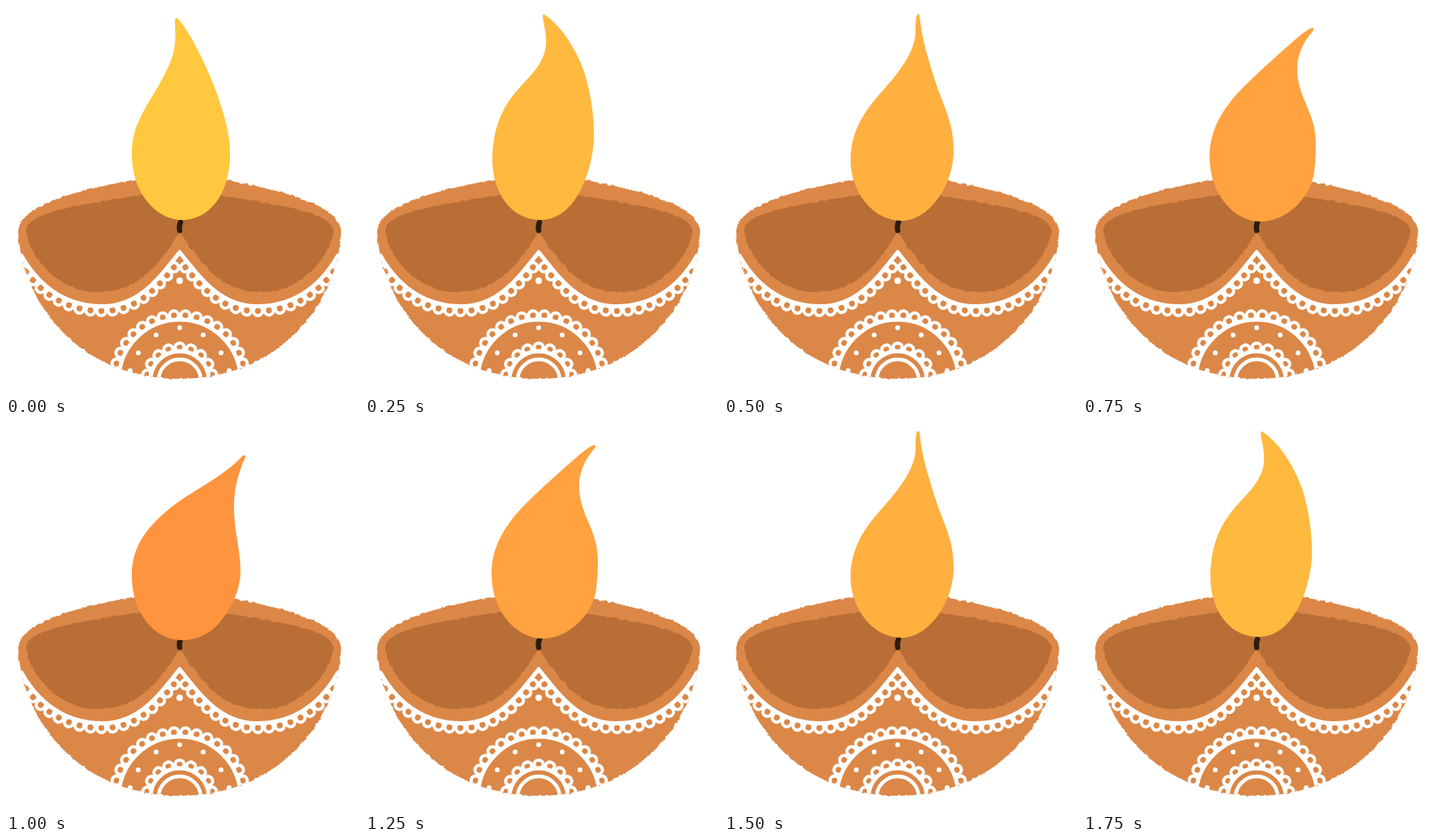
Animation, 435 px wide and 480 px high, one loop 2 s. Source, as an HTML page:

```html
<!DOCTYPE html>
<html lang="en">
<head>
<meta charset="utf-8">
<title>Diya</title>
<style>
  html, body { margin: 0; width: 100%; height: 100%; overflow: hidden; background: #fff; }
  svg { display: block; width: 435px; height: 480px; }
</style>
</head>
<body>
<svg viewBox="0 0 435 480">
  <defs>
    <path id="bowl" d="M15 278C18 248 70 231 160 214L268 214C358 231 410 248 413 278C408 372 333 460 214 460C95 460 20 372 15 278Z"/>
    <clipPath id="inBowl"><use href="#bowl"/></clipPath>
    <filter id="rough" x="-5%" y="-5%" width="110%" height="110%" color-interpolation-filters="sRGB">
      <feTurbulence type="fractalNoise" baseFrequency=".16" numOctaves="2" seed="4"/>
      <feDisplacementMap in="SourceGraphic" scale="3.5" xChannelSelector="R" yChannelSelector="G"/>
    </filter>
  </defs>
  <g filter="url(#rough)">
    <use href="#bowl" fill="#db8747"/>
    <path fill="#b96e36" d="M25 276C29 255 80 247 168 233L260 233C348 247 399 255 403 276C404 300 370 353 315 353C265 353 240 318 214 278C190 318 165 353 112 353C60 353 24 300 25 276Z"/>
  </g>
  <g clip-path="url(#inBowl)" fill="none" stroke="#fff">
    <g id="lace"></g>
    <use href="#lace" transform="translate(428) scale(-1 1)"/>
    <g id="arcs"></g>
    <g id="dots" fill="#fff" stroke="none"></g>
  </g>
  <path d="M215 267Q213 271 214 277" fill="none" stroke="#2b1d10" stroke-width="6.5" stroke-linecap="round"/>
  <path id="flame"/>
</svg>
<script>
const $ = id => document.getElementById(id);

function add(parent, tag, attrs) {
  const el = document.createElementNS("http://www.w3.org/2000/svg", tag);
  for (const k in attrs) el.setAttribute(k, attrs[k]);
  return parent.appendChild(el);
}

// A line with a row of small loops; side 1 puts them below it, -1 above
function trim(parent, d, side, count, height, reach = 1) {
  const line = add(parent, "path", { d, "stroke-width": 5, "stroke-linecap": "round" });
  const step = line.getTotalLength() * reach / count;
  for (let i = 0; i < count; i++) {
    const s = (i + .5) * step;
    const p = line.getPointAtLength(s), a = line.getPointAtLength(s - 1), b = line.getPointAtLength(s + 1);
    const angle = Math.atan2(b.y - a.y, b.x - a.x) * 180 / Math.PI;
    add(parent, "ellipse", {
      cy: height * side, rx: 5.6, ry: height, "stroke-width": 4,
      transform: `translate(${p.x} ${p.y}) rotate(${angle})`
    });
  }
}

const arc = r => `M${214 - r} 462A${r} ${r} 0 0 1 ${214 + r} 462`;

trim($("lace"), "M19 308C45 354 82 371 120 370.5C163 370 187 338 214 304", 1, 18, 5.8, .95);
trim($("arcs"), arc(75), -1, 18, 5.5);
trim($("arcs"), arc(36), -1, 9, 5);
add($("arcs"), "path", { d: arc(26), "stroke-width": 4.5 });

const dots = [[214, 339], [214, 397], [185, 406], [163, 428], [153, 450]];
for (const [x, y] of dots)
  for (const cx of new Set([x, 428 - x])) add($("dots"), "circle", { cx, cy: y, r: y < 350 ? 4 : 3 });

// Flame poses, from upright to leaning right
const poses = [
  ["#ffc83f", "M211 15C222 24 246 70 258 103C269 133 277 160 276 186C275 233 250 264 217 264C186 264 155 232 155 182C155 140 180 118 200 75C210 54 209 40 208 18Q209 14 211 15Z"],
  ["#ffb93f", "M220 10C240 22 261 53 271 84C279 111 283 140 282 166C280 200 262 264 216 264C180 264 157 230 157 190C157 160 165 132 182 111C198 90 221 74 223 48C224 34 220 24 219 12Z"],
  ["#ffb03f", "M241 11C243 40 253 70 264 104C275 132 283 150 283 178C283 222 252 265 219 265C184 265 156 230 156 190C156 158 170 134 189 112C210 88 234 62 236 34C236 24 236 14 238 11Q239 9 241 11Z"],
  ["#ffa23f", "M284 30C270 46 263 62 264 82C266 110 279 124 285 150C288 168 287 185 285 205C280 238 250 266 219 266C186 266 156 232 156 186C156 155 170 130 192 106C214 83 243 58 262 41C270 34 277 29 282 27Q285 27 284 30Z"],
  ["#ff943e", "M295 42C286 62 280 84 281 108C282 138 289 156 289 184C288 212 274 234 260 250C248 262 232 268 217 268C181 268 155 232 155 188C155 150 176 126 206 102C236 80 268 66 292 40Q295 39 295 42Z"]
];

function draw() {
  const step = Math.floor(performance.now() / 250) % 8;
  const [fill, d] = poses[step < 5 ? step : 8 - step];
  $("flame").setAttribute("fill", fill);
  $("flame").setAttribute("d", d);
  requestAnimationFrame(draw);
}
draw();
</script>
</body>
</html>
```
